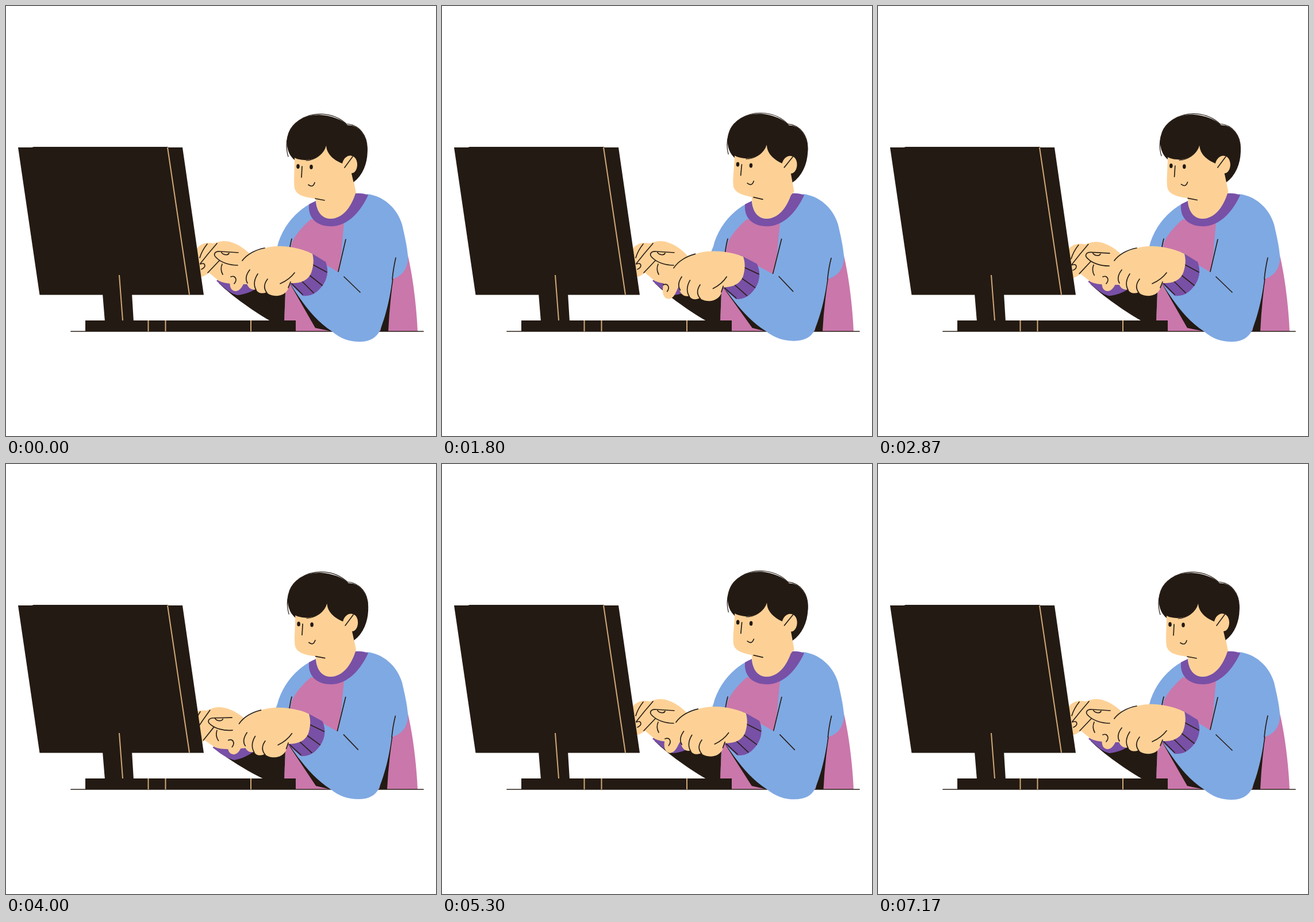
An HTML page that plays this animation: 748x748 px, repeating every 7210 ms.

```html
<!DOCTYPE html>
<html>
<head>
<meta charset="utf-8">
<title>Typing at a desk</title>
<style>
  html, body { margin: 0; width: 100%; height: 100%; overflow: hidden; background: #fff; }
  svg { display: block; width: 100vw; height: 100vh; }
  .dark { fill: #231a13; }
  .skin { fill: #fdd196; }
  .blue { fill: #7fa9e3; }
  .pink { fill: #ca77ab; }
  .purple { fill: #7850a6; }
  .line, .tan { fill: none; stroke: #2b2019; stroke-width: 1.7; stroke-linecap: round; stroke-linejoin: round; }
  .tan { stroke: #d2a977; stroke-width: 2; stroke-linecap: butt; }
  .hair { stroke: #231a13; stroke-width: 1.5; }
  .strand { stroke-width: 1.2; }
</style>
</head>
<body>
<svg viewBox="0 0 748 748">
  <!-- torso and neck -->
  <path class="blue" d="M535 341C505 355 480 385 472 418L462 443L500 460L560 380Z"/>
  <path class="pink" d="M530 371C517 383 505 395 498 410L490 440L487 480L483 566H716C714 520 707 465 698 430L588 376Z"/>
  <path class="line" d="M497 405Q493 420 491 443"/>

  <!-- far arm -->
  <path class="dark" data-far="M370>358 482>510C388>380 500>522 425>405 528>536 460>437 548L484 548L487 475L430 455Z"/>
  <g id="farHand">
    <path class="purple" d="M366 478C380 491 390 500 402 503C415 502 428 497 438 490L428 443L400 450Z"/>
    <path class="skin" d="M432 440C418 422 396 408 378 409C371 409 366 412 361 413C349 410 338 413 330 424L324 462C326 475 342 474 353 464L370 478C382 484 400 484 425 484Z"/>
    <path class="line" d="M350 414Q341 425 337 438M367 413Q352 430 338 448M371 443L351 464M404 429L373 427C362 426 360 433 366 438C374 446 388 451 403 451M374 427C377 434 386 434 388 430M376 449Q372 458 377 467M338 449C347 445 349 454 340 458"/>
  </g>

  <!-- computer and desk -->
  <path class="line" d="M113 566H726"/>
  <path class="dark" d="M138 547H504V566H138ZM168 500H219L222 549H172ZM21 246H45L48 245H281L283 246H307L344 502.500H58.500Z"/>
  <path class="tan" d="M281 246L319 502M197 468L203 547M247.500 547V566M277.500 547V566M426 547V566"/>

  <!-- near arm -->
  <path class="dark" data-near="M672>668 472L651>642 566H665>656Q667>659 520 674>669 472ZM494>480 483>503L538>543 560L567>556 566L540 525Z"/>
  <path class="blue" data-near="M628 327C655 330 680 350 689 380C693 398 698 418 699 435C700 455 690 470 672>667 475C668>662 510 660>653 540 651>642 563>566C645>636 577>576 633>622 584>580 615>605 584>580C598>588 584>580 582>570 579>574 567>555 566>564C535>530 545>550 515>505 515>526 495>484 484>504L540>520 440>450L578>571 463>473L583>582 432L588 376L606 345Z"/>
  <path class="line" data-near="M591>590 406>404L578>571 462>472M678>675 438>440Q674>670 455 672>668 475"/>
  <path class="line" id="crease"/>

  <path class="skin" d="M538 325L540 345C545 385 590 385 606 340L609 326L603 295Z"/>
  <path class="purple" d="M527 345L539 339C540 357 549 371 567 370C589 368 602 345 608 326Q620 325 630 329C620 351 600 380 570 383C542 385 525 370 527 345Z"/>

  <g id="nearHand">
    <path class="purple" d="M528 428L556 445C562 459 560 478 546 492C537 502 527 505 516 504L494 483Z"/>
    <path class="line" d="M532 449L558 463M525 466L550 486M511 475L535 499M497 483L516 502"/>
    <path class="skin" d="M533 431C515 422 490 417 470 418C445 419 420 432 411 443C402 455 391 466 390 476C388 487 391 496 400 496C409 495 412 485 418 475C418 489 426 495 435 493C438 500 446 501 453 498C462 507 486 508 492 489L495 482C515 483 526 476 531 464C535 452 536 442 533 431Z"/>
    <path class="line" d="M411 443C419 432 434 424 450 421M424 459Q414 472 420 482M438 466Q428 481 435 494M455 475Q445 488 454 499M502 464Q493 476 477 483M495 480Q493 485 491 490M391 471C399 468 403 476 397 483"/>
  </g>

  <g id="head">
    <path class="dark hair" d="M502 267C488 255 487 235 492 221C499 202 520 190 545 190C565 191 584 198 594 208C613 207 627 225 628 248C629 274 619 295 604 306L570 290Z"/>
    <path class="line strand" d="M491 262C484 240 489 214 510 199C535 182 570 185 592 205C614 206 630 225 628 252"/>
    <path class="skin" d="M557 243C552 258 540 268 520 268Q510 268 502 264C502 290 500 305 502 317C505 330 522 333 538 335L544 349L590 345L608 322L601 291C611 291 615 271 606 263C597 256 587 264 585 274C570 268 558 258 557 243Z"/>
    <path class="line strand" d="M522 269C538 268 550 258 555 247"/>
    <path class="line" d="M515 279L514 298M526 311Q534 317 537 307M538 335L554 338M603 262L589 281"/>
    <ellipse class="dark eye" cx="508" cy="279" rx="2.800"/>
    <ellipse class="dark eye" cx="531" cy="280" rx="2.800"/>
  </g>
</svg>
<script>
const $ = id => document.getElementById(id);
const CYCLE = 3600, LOOP = 7210;

// Each key is [time, value], joined by sine easing.
const HEAD = [[0, 0], [1500, 1], [3600, 0]];
const NEAR = [[100, 0], [1050, 1], [1600, .1], [2150, .9], [2830, 0]];
const FAR = [[100, 0], [700, 1], [1300, 0], [1850, 0], [2400, 1], [2950, 0]];
const BLINK = [[1000, 1], [1150, .1], [1300, 1]];

function track(keys, t) {
  const next = keys.findIndex(k => k[0] > t);
  if (next < 0) return keys[keys.length - 1][1];
  if (!next) return keys[0][1];
  const [t0, v0] = keys[next - 1], [t1, v1] = keys[next];
  return v0 + (v1 - v0) * (1 - Math.cos(Math.PI * (t - t0) / (t1 - t0))) / 2;
}

// "a>b" in a path moves from a to b as k goes from 0 to 1.
const blend = (path, k) => path.replace(/(\d+)>(\d+)/g, (_, a, b) => +a + (b - a) * k);

function pose(side, k) {
  document.querySelectorAll(`[data-${side}]`).forEach(el =>
    el.setAttribute('d', blend(el.dataset[side], k)));
}

function draw(now) {
  const t = now % LOOP % CYCLE;
  const near = track(NEAR, t), far = track(FAR, t);
  pose('near', near);
  pose('far', far);
  $('crease').setAttribute('d', blend('M588>537 471>458', near ** 3) + blend('L616>600 498>493', near));
  $('nearHand').setAttribute('transform', `translate(${-27 * near} ${15 * near}) rotate(${-11 * near} 533 430)`);
  $('farHand').setAttribute('transform', `translate(${-21 * far} ${29 * far}) rotate(${-10 * far} 375 432)`);
  $('head').setAttribute('transform', `rotate(${2.55 * track(HEAD, t)} 595 430)`);
  document.querySelectorAll('.eye').forEach(eye => eye.setAttribute('ry', 4 * track(BLINK, t)));
}

const start = performance.now();
function tick() {
  draw(performance.now() - start);
  requestAnimationFrame(tick);
}
tick();
</script>
</body>
</html>
```
